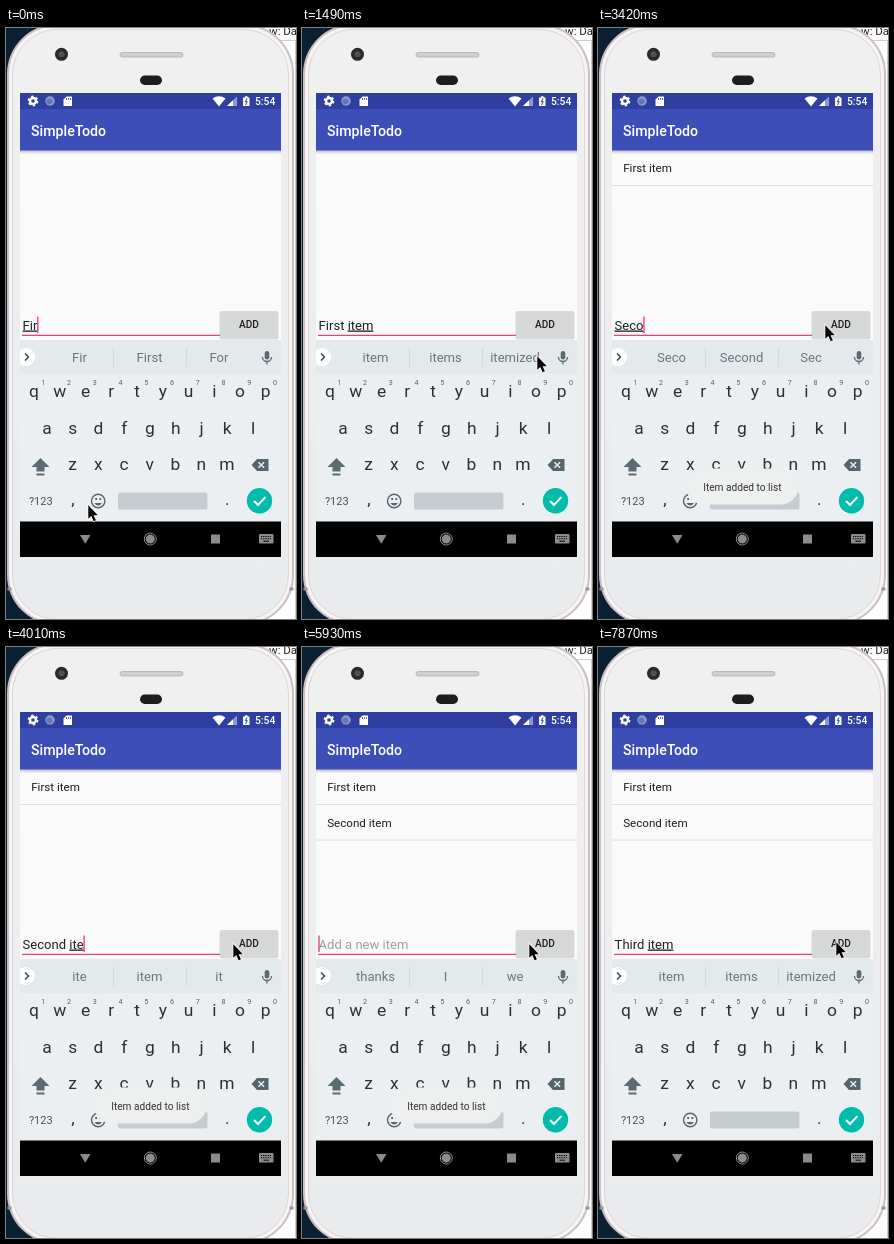
An HTML page for the animation above (8 s loop, 290 by 591 pixels).

```html
<!DOCTYPE html>
<html lang="en">
<head>
<meta charset="utf-8">
<title>Todo list demo</title>
<style>
html, body { margin: 0; width: 100%; height: 100%; overflow: hidden; background: #fff; }
svg { display: block; width: 290px; height: 591px; }
text { font-family: Roboto, sans-serif; white-space: pre; }
.mid { text-anchor: middle; }
.key { font-size: 17.4px; fill: #263238; }
.hint { font-size: 7.2px; fill: #53636a; }
.word { font-size: 13.05px; fill: #68777e; }
.item { font-size: 11.6px; fill: #1d1d1d; }
.field { font-size: 13.05px; fill: #202020; }
.composing { text-decoration: underline 1px; }
</style>
</head>
<body>
<svg viewBox="0 0 290 591">
  <defs>
    <linearGradient id="body" x2="0" y2="1">
      <stop stop-color="#f1f0f1"/><stop offset="1" stop-color="#e9ebec"/>
    </linearGradient>
    <linearGradient id="shade" x2="0" y2="1">
      <stop stop-color="#000" stop-opacity=".25"/><stop offset="1" stop-color="#000" stop-opacity="0"/>
    </linearGradient>
    <clipPath id="screen"><path d="M14 65h261v464H14z"/></clipPath>
  </defs>

  <!-- desktop and phone -->
  <path fill="#0b2133" d="M0 0h145v591H0z"/>
  <path fill="#fff" d="M145 0h145v591H145z"/>
  <path stroke="#ccc" d="M260 12.5h30M289.5 12v579"/>
  <text x="263" y="7" font-size="11.5" fill="#222">w: Da</text>
  <rect x="1" y="-4" width="287" height="601" rx="50" fill="#c9c0c4"/>
  <rect x="3" y="-2" width="283" height="597" rx="48" fill="#f7f3f4"/>
  <path stroke="#9a9396" stroke-width="3" d="M1.500 561h4M283.500 561h4"/>
  <rect x="6.500" y="1.500" width="276" height="590" rx="45" fill="url(#body)" stroke="#ddd5d8"/>
  <circle cx="55.500" cy="26.300" r="6.500" fill="#29292c"/>
  <circle cx="55.500" cy="26.300" r="3" fill="#55504f"/>
  <rect x="114" y="24.500" width="63" height="4.500" rx="2.250" fill="#cfcfd1" stroke="#adadb0" stroke-width=".8"/>
  <rect x="134" y="47.500" width="22" height="9.500" rx="4.750" fill="#1d1d20"/>

  <g clip-path="url(#screen)">
    <path fill="#fafafa" d="M14 65h261v464H14z"/>
    <g id="list"></g>
    <path fill="url(#shade)" d="M14 122h261v4.500H14z"/>
    <path fill="#303f9f" d="M14 65h261v16H14z"/>
    <path fill="#3e4eb8" d="M14 81h261v41.500H14z"/>
    <text x="25" y="108" font-size="14.200" font-weight="500" fill="#fff">SimpleTodo</text>

    <!-- status bar -->
    <circle cx="27" cy="73" r="3" fill="none" stroke="#fff" stroke-width="2.4"/>
    <circle cx="27" cy="73" r="4.7" fill="none" stroke="#fff" stroke-width="1.4" stroke-dasharray="2.4 2.52"/>
    <circle cx="44" cy="73" r="4.7" fill="#8f9ad0"/>
    <circle cx="43.5" cy="73.5" r="3" fill="#6875bb"/>
    <path fill="#fff" d="M60.500 68.500H66V78H57.500V71.500z"/>
    <path stroke="#303f9f" d="M60.500 70v2M62.500 70v2M64.500 70v2" stroke-width=".8"/>
    <path fill="#fff" d="M206.500 70.500Q213 66 219.500 70.500L213 78.500z"/>
    <path fill="#8f98cc" d="M221 78L231 68.500V78z"/>
    <path fill="#fff" d="M221 78L227 72.300V78z"/>
    <path fill="#fff" d="M237 69.500h2v-1.200h2.500v1.200h2V78H237z"/>
    <path stroke="#303f9f" fill="none" d="M241 70.500l-1.700 3.200h2l-1.700 3.200"/>
    <text x="249" y="77" font-size="10.300" font-weight="500" fill="#fff">5:54</text>

    <!-- entry row -->
    <path fill="#ee3f7c" d="M16 306.800h198v1.300H16z"/>
    <text id="entry" class="field" x="16.600" y="301.500"><tspan></tspan><tspan class="composing"></tspan></text>
    <text id="prompt" class="field" x="16.600" y="301.500" style="fill:#a0a0a0">Add a new item</text>
    <path id="caret" fill="#f5407f" d="M0 288.500h1.400v16.500H0z"/>
    <rect x="213.500" y="284" width="59" height="27.500" rx="2" fill="#000" opacity=".13"/>
    <rect id="button" x="214" y="283" width="58" height="27" rx="1.500"/>
    <text class="mid" x="243" y="299.800" font-size="10.150" font-weight="500" fill="#202020">ADD</text>

    <!-- keyboard -->
    <path fill="#eceff1" d="M14 312h261v182H14z"/>
    <path fill="#e4e9ec" d="M14 312h261v34H14z"/>
    <path stroke="#d2d8db" d="M107.500 320v19M180.500 320v19"/>
    <circle cx="20" cy="329" r="9" fill="#fff"/>
    <path d="M19 325.500l3.500 3.500-3.500 3.500" fill="none" stroke="#37474f" stroke-width="1.500"/>
    <g id="words"></g>
    <rect x="258.700" y="323" width="4.600" height="8.500" rx="2.300" fill="#5b6b72"/>
    <path d="M256.500 329a4.500 4.500 0 0 0 9 0M261 333.500v3" fill="none" stroke="#5b6b72" stroke-width="1.300"/>
    <g id="keys"></g>
    <path fill="#5b6b72" d="M34.500 430l9 9h-5v4.500h-8v-4.500h-5zM30.500 445.500h8v2h-8z"/>
    <path fill="#55656c" d="M251 431h11.500v12H251l-5.500-6z"/>
    <path stroke="#eceff1" stroke-width="1.400" d="M252.500 434.200l5.600 5.600M258.100 434.200l-5.600 5.600"/>
    <text class="mid" x="34.800" y="476.800" font-size="11" fill="#46555c">?123</text>
    <g fill="none" stroke="#55656c" stroke-width="1.400">
      <circle cx="92.200" cy="473" r="6.700"/>
      <path d="M88.500 475a4 4 0 0 0 7.400 0z" fill="#55656c" stroke="none"/>
      <path d="M89.200 471h1.800M93.400 471h1.800" stroke-width="1.800"/>
    </g>
    <rect x="112" y="464.500" width="89.500" height="17" rx="2" fill="#c6cdd1"/>
    <circle cx="253.500" cy="472.700" r="12.700" fill="#00bcab"/>
    <path d="M248 473l4 4 7.500-8" fill="none" stroke="#fff" stroke-width="2"/>

    <!-- navigation bar -->
    <path d="M14 493.500h261v36H14z"/>
    <g fill="#8c8c8c">
      <path d="M74 507h10.500l-5.250 8.800z"/>
      <circle cx="144.300" cy="511" r="4.500"/>
      <circle cx="144.300" cy="511" r="6" fill="none" stroke="#8c8c8c"/>
      <path d="M205 506.500h9v9h-9z"/>
      <rect x="253" y="506" width="14.500" height="9.500" rx="1"/>
    </g>
    <path stroke="#000" stroke-dasharray="1.200 1" d="M255 508.500h11M255 510.700h11"/>
    <path stroke="#000" d="M257.500 513.200h5.500"/>

    <g id="toast">
      <rect x="88" y="440.500" width="112.500" height="36" rx="18" fill="#eeefef"/>
      <text class="mid" x="144.300" y="463" font-size="10.150" fill="#343434">Item added to list</text>
    </g>
  </g>
  <path id="pointer" d="M0 0V13.500l3-2.800 2.300 5.200 2.300-1-2.300-5h4.300z" stroke="#fff" stroke-width="1.400" paint-order="stroke"/>
</svg>
<script>
const LOOP = 8000;
const $ = id => document.getElementById(id);
const label = (cls, x, y, text) => `<text class="${cls}" x="${x}" y="${y}">${text}</text>`;

// Each track holds [start, ...values]; a value stays until the next start.
const typing = [
  [0, "Fir", "Fir First For"],
  [150, "Firs", "Firs First Firstly"],
  [300, "First", "First Firstly Firsthand"],
  [600, "First ", "time of and"],
  [750, "First i", "I in is"],
  [890, "First ite", "ite item it"],
  [1040, "First item", "item items itemized"],
  [2090, "", "thanks I we"],
  [2980, "S", "S So See"],
  [3130, "Se", "Se See Send"],
  [3280, "Seco", "Seco Second Sec"],
  [3430, "Secon", "Secon Second Seconds"],
  [3570, "Second", "Second Seconds Secondary"],
  [3720, "Second ", "time one of"],
  [3870, "Second it", "it its item"],
  [4010, "Second ite", "ite item it"],
  [4160, "Second item", "item items itemized"],
  [4750, "", "thanks I we"],
  [5480, "T", "T The To"],
  [5930, "", "thanks I we"],
  [6230, "Th", "Th The Those"],
  [6520, "Thi", "Thi This Think"],
  [6670, "Thir", "Thir Third Thirty"],
  [6820, "Third", "Third Thirds Thirdly"],
  [6970, "Third ", "party time one"],
  [7120, "Third i", "I in is"],
  [7270, "Third ite", "ite item it"],
  [7420, "Third item", "item items itemized"]
];
const caretOn = [[0, 1], [1490, 0], [2090, 1], [2680, 0], [2980, 1], [4600, 0], [4750, 1], [5340, 0], [5480, 1], [7720, 0]];
const items = [[0, 0], [2090, 1], [4750, 2]];
const pressed = [[0, 0], [1940, 1], [2380, 0], [4600, 1], [5040, 0]];
const toastAlpha = [
  [0, 0], [2230, .35], [2380, .75], [2530, .93], [2680, 1], [4310, .5], [4450, 0],
  [4900, .38], [5040, .8], [5190, 1], [6970, .45], [7120, 0]
];
const pointerAt = [[0, 82.3, 477.3], [1340, 172, 394], [1490, 235.3, 328.3], [1640, 227.3, 297.3], [7870, 238.3, 295.3]];

const at = (track, time) => track.findLast(step => step[0] <= time).slice(1);

const keyRow = (letters, x, y) => [...letters].map((c, i) => label("key mid", x + i * 25.75, y, c)).join("");
$("keys").innerHTML =
  keyRow("qwertyuiop", 28, 369) + keyRow("asdfghjkl", 41, 405.5) + keyRow("zxcvbnm", 66.5, 442) +
  [..."1234567890"].map((c, i) => label("hint mid", 37.3 + i * 25.75, 357, c)).join("") +
  label("key mid", 67, 477, ",") + label("key mid", 221.3, 477, ".");
$("words").innerHTML = [73.5, 143.5, 213].map(x => label("word mid", x, 334, "")).join("");
$("list").innerHTML = ["First item", "Second item"].map((name, i) =>
  `<g>${label("item", 25.2, 144.3 + i * 35.5, name)}<path stroke="#dedede" d="M14 ${157.5 + i * 35.5}h261"/></g>`).join("");

const entry = $("entry");

function render(time) {
  const [text, words] = at(typing, time);
  const composing = text.match(/\S*$/)[0];
  entry.children[0].textContent = text.slice(0, text.length - composing.length);
  entry.children[1].textContent = composing;
  $("prompt").setAttribute("opacity", text ? 0 : 1);
  words.split(" ").forEach((word, i) => $("words").children[i].textContent = word);

  const width = text ? entry.getComputedTextLength() : 0;
  $("caret").setAttribute("transform", `translate(${16.3 + width})`);
  $("caret").setAttribute("opacity", at(caretOn, time)[0]);

  const [count] = at(items, time);
  [...$("list").children].forEach((row, i) => row.setAttribute("opacity", i < count ? 1 : 0));
  $("button").setAttribute("fill", at(pressed, time)[0] ? "#c0c1c1" : "#d6d7d7");
  $("toast").setAttribute("opacity", at(toastAlpha, time)[0]);
  $("pointer").setAttribute("transform", `translate(${at(pointerAt, time)})`);
}

const start = performance.now();
function tick() {
  render((performance.now() - start) % LOOP);
  requestAnimationFrame(tick);
}
tick();
</script>
</body>
</html>
```
